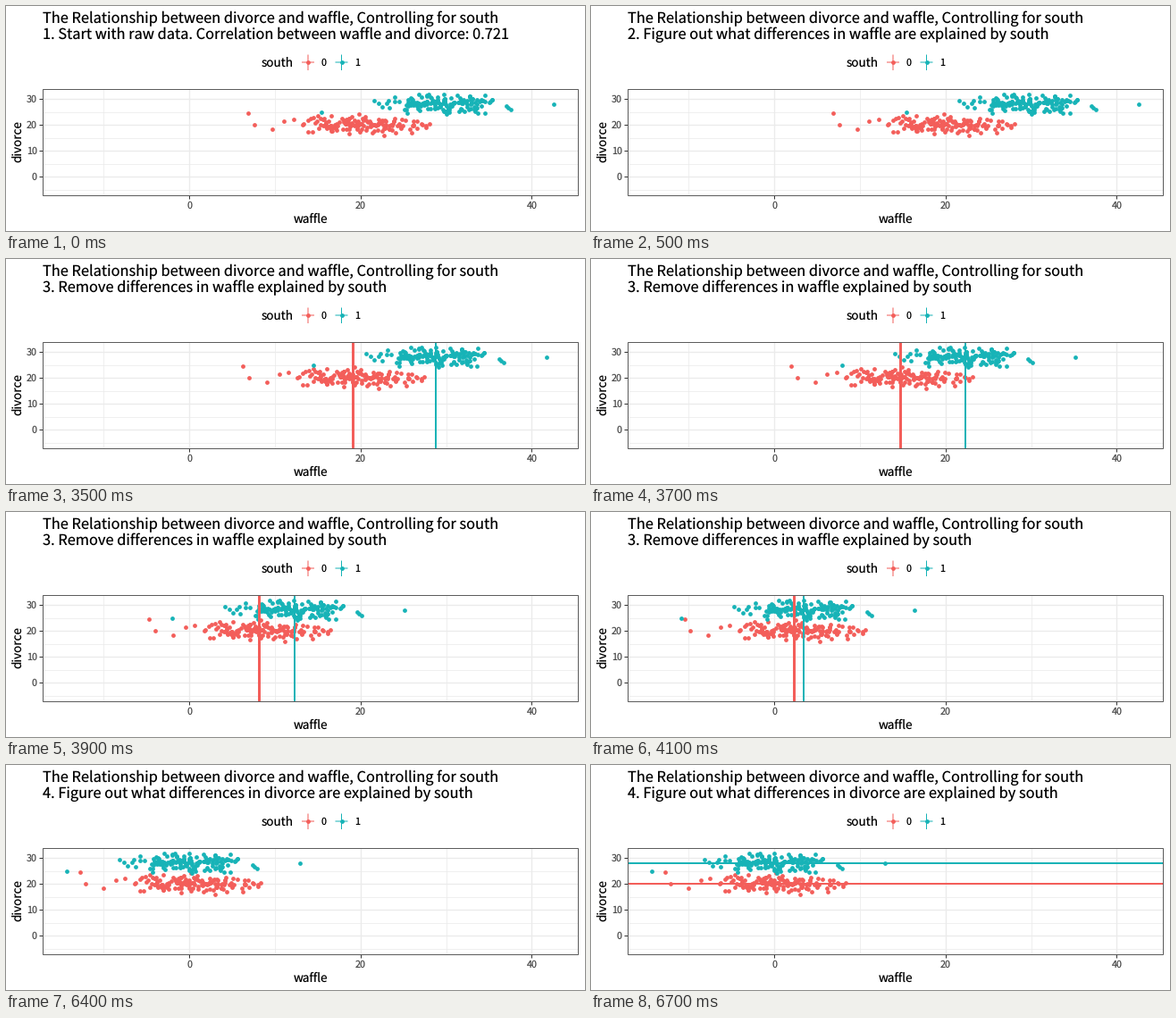
Recreate the animation shown at these times as a matplotlib script. Size 648 px wide and 252 px high, loop 8000 ms.

```python
import numpy as np
import matplotlib.pyplot as plt
from matplotlib.animation import FuncAnimation
from matplotlib.patches import Rectangle

WIDTH, HEIGHT, DPI = 648, 252, 72  # at 72 dpi one point is one pixel
STEP_MS, LOOP_MS = 100, 8000
RED, TEAL, BOTH = "#F35E5A", "#17B3B7", "#6E4A46"
LEFT, RIGHT, TOP, BOTTOM = 41, 640, 93, 212
MOVE_START, MOVE_STEPS = 3500, 9

plt.rcParams.update({
    "font.family": "Noto Sans CJK JP",
    "text.hinting": "no_hinting",
    "toolbar": "None",
})

HEADING = "The Relationship between divorce and waffle, Controlling for south"
STEPS = [
    (0, "1. Start with raw data. Correlation between waffle and divorce: 0.721"),
    (500, "2. Figure out what differences in waffle are explained by south"),
    (3500, "3. Remove differences in waffle explained by south"),
    (6400, "4. Figure out what differences in divorce are explained by south"),
]


def waffle_px(value):
    return 205 + 9.585 * value


def divorce_px(value):
    return 191 - 2.9 * value


def scatter(seed, mean, outliers, count=150, spread=(3.9, 1.9), reach=2.35):
    """Normal cloud trimmed to an ellipse, plus its few far outliers."""
    z = np.random.default_rng(seed).normal(size=(2 * count, 2))
    z = z[np.hypot(z[:, 0], z[:, 1]) < reach][:count]
    return np.vstack([mean + z * spread, outliers])


MEANS = np.array([(19.67, 20.0), (29.7, 28.0)])  # waffle, divorce
COLORS = (RED, TEAL)
CLOUDS = [
    scatter(4, MEANS[0], [(6.9, 24.6), (7.6, 20.1), (9.7, 18.4), (11.1, 21.3)]),
    scatter(9, MEANS[1], [(15.4, 24.8), (42.6, 27.9)]),
]

fig = plt.figure(figsize=(WIDTH / DPI, HEIGHT / DPI), dpi=DPI, facecolor="white")
ax = fig.add_axes([0, 0, 1, 1])
ax.set(xlim=(0, WIDTH), ylim=(HEIGHT, 0))
ax.axis("off")


def line(x, y, color, width=1, z=1, **style):
    return ax.plot(x, y, color=color, lw=width, zorder=z,
                   solid_capstyle="butt", **style)[0]


def label(x, y, text, size, color="black", **style):
    return ax.text(x, y, text, fontsize=size, color=color, va="baseline", **style)


def dots(x, y, color):
    return ax.plot(x, y, "o", ms=4.8, mew=0, color=color, zorder=3, snap=False)[0]


def grid_line(x, y, major):
    line(x, y, "#EBEBEB", 1.4 if major else 0.8)


def draw_panel():
    for value in range(-10, 41, 10):
        major = value % 20 == 0
        x = waffle_px(value)
        grid_line([x, x], [TOP, BOTTOM], major)
        if major:
            line([x, x], [BOTTOM, BOTTOM + 4], "#333333")
            label(x + 0.5, 227, value, 10.8, "#4D4D4D", ha="center")
    for value in range(-5, 31, 5):
        major = value % 10 == 0
        y = divorce_px(value)
        grid_line([LEFT, RIGHT], [y, y], major)
        if major:
            line([LEFT - 4, LEFT], [y, y], "#333333")
            label(35, y + 4, value, 10.8, "#4D4D4D", ha="right")
    ax.add_patch(Rectangle((LEFT, TOP), RIGHT - LEFT, BOTTOM - TOP,
                           fill=False, ec="#5C5C5C", lw=1, zorder=6))
    label(341, 243, "waffle", 13.5, ha="center")
    label(17, 152, "divorce", 13.5, ha="center", rotation=90, rotation_mode="anchor")


def draw_legend():
    label(286, 68, "south", 13.5)
    for x, name, color in ((338, "0", RED), (375.5, "1", TEAL)):
        line([x, x], [54.5, 72], color, snap=False)
        line([x - 7, x + 7], [63, 63], color, snap=False)
        dots([x], [63], color)
        label(x + 15, 67, name, 10.8)


draw_panel()
draw_legend()
label(41, 19, HEADING, 16.4)
subtitle = label(41, 37, "", 16.4)

clouds = [dots([], [], color) for color in COLORS]
waffle_lines = [line([], [], color, 2, 5) for color in COLORS]
divorce_lines = [line([LEFT, RIGHT], [divorce_px(mean)] * 2, color, 2, 5)
                 for mean, color in zip(MEANS[:, 1], COLORS)]


def removed_share(ms):
    """Sine ease in and out; the first visible step is already under way."""
    step = (ms - MOVE_START) / STEP_MS + 1
    return (1 - np.cos(np.pi * np.clip(step / MOVE_STEPS, 0, 1))) / 2


def update(frame):
    ms = frame * STEP_MS
    subtitle.set_text([text for start, text in STEPS if start <= ms][-1])

    share = removed_share(ms)
    merged = share >= 1
    for points, artist, mean, mean_line in zip(CLOUDS, clouds, MEANS[:, 0], waffle_lines):
        waffle, divorce = points.T
        artist.set_data(waffle_px(waffle - mean * share), divorce_px(divorce))
        x = waffle_px(mean * (1 - share))
        mean_line.set_data([x, x], [TOP, BOTTOM])
        mean_line.set_visible(800 <= ms < 6400)

    red_line, teal_line = waffle_lines
    red_line.set_linewidth(3 if 0 < share < 1 else 2)
    if merged:
        red_line.set_visible(False)
    teal_line.set(color=BOTH if merged else TEAL, linewidth=1 if merged else 2)

    for mean_line in divorce_lines:
        mean_line.set_visible(ms >= 6700)
    return []


animation = FuncAnimation(fig, update, frames=LOOP_MS // STEP_MS,
                          interval=STEP_MS, repeat=True, repeat_delay=0)
plt.show()
```
